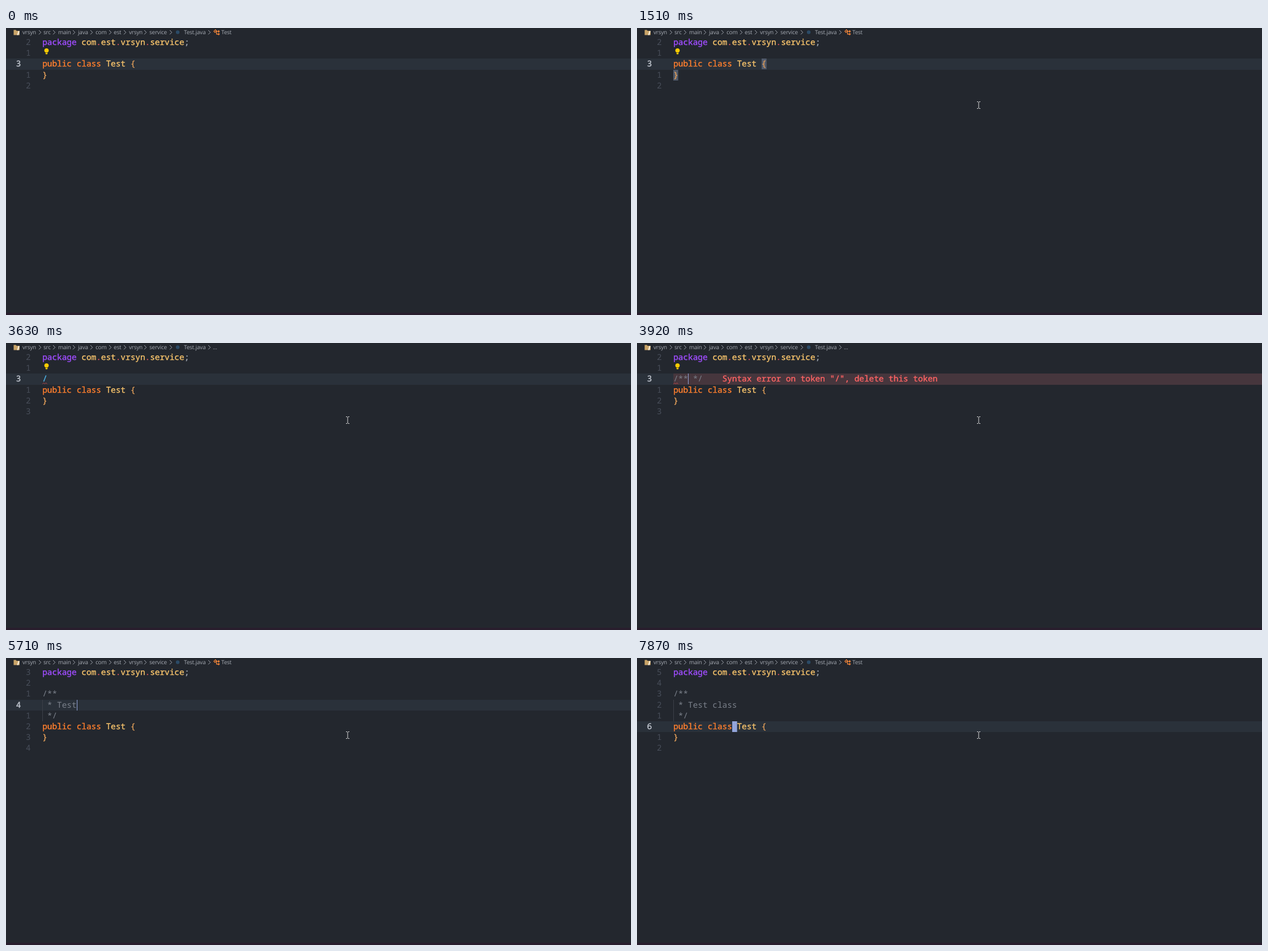
Animation of 1103 by 508 pixels, one loop 8 s. Source, as an HTML page:

```html
<!DOCTYPE html>
<html lang="en">
<head>
<meta charset="utf-8">
<title>Editor</title>
<style>
html, body { margin: 0; width: 100%; height: 100%; overflow: hidden; background: #23272e; }
svg { display: block; width: 1103px; height: 508px; }
text { white-space: pre; text-rendering: geometricPrecision; font: 500 14.4px "Noto Sans Mono", monospace; stroke-width: .4px; }
.crumb { font: 400 10px "Open Sans", "Noto Sans", sans-serif; letter-spacing: -.2px; fill: #a4a9b1; }
.line { fill: none; }
</style>
</head>
<body>
<svg id="stage" viewBox="0 0 1103 508"></svg>
<script>
const LOOP = 8000, LEFT = 64.2, CH = 8.64, ROW = 19.2, TOP = 16;
const BG = '#23272e', ACTIVE = '#2a313a', CURSOR = '#93a5da';
const PURPLE = '#a04dff', YELLOW = '#f8c46c', RED = '#e05561', GREY = '#a0a8b4',
      ORANGE = '#ff7f2e', BRACE = '#e29f5a', BLUE = '#4fb4e8', COMMENT = '#7b818b';
const ERROR = '    Syntax error on token "/", delete this token';

const stage = document.getElementById('stage');
const between = (t, a, b) => t >= a && t < b;
const colX = c => LEFT + c * CH;
const rowY = r => Math.round(TOP + r * ROW);
const baseY = r => rowY(r) + 14;
const plain = line => line.map(p => p[1]).join('');
const rect = (x, y, w, h, fill) => `<rect x="${x}" y="${y}" width="${w}" height="${h}" fill="${fill}"/>`;
const text = (x, y, fill, s) => `<text x="${x}" y="${y}" fill="${fill}">${s}</text>`;
// Code is slightly heavier than comments
const span = ([c, s]) => `<tspan fill="${c}" stroke="${c === COMMENT ? 'none' : c}">${s}</tspan>`;
const crumb = (x, s) => `<text class="crumb" x="${x}" y="11">${s}</text>`;
const path = (d, stroke, w = 1) => `<path class="line" d="${d}" stroke="${stroke}" stroke-width="${w}"/>`;
const cell = (c, r, w, fill) => rect(Math.round(colX(c)), rowY(r), w, 19, fill);
const band = (r, x, fill) => rect(x, rowY(r), 1103 - x, rowY(r + 1) - rowY(r), fill);

const pkg = [[PURPLE, 'package '], [YELLOW, 'com'], [RED, '.'], [YELLOW, 'est'], [RED, '.'],
             [YELLOW, 'vrsyn'], [RED, '.'], [YELLOW, 'service'], [GREY, ';']];
const cls = [[ORANGE, 'public class '], [YELLOW, 'Test '], [BRACE, '{']];
const end = [[BRACE, '}']];
const note = s => [[COMMENT, s]];

// Key times for the typed comment
const TYPED = 'Test class';
const KEYS = [5130, 5430, 5610, 5710, 6280, 6800, 6990, 7030, 7220, 7420];

function scene(t) {
  if (t < 2560) {
    const up = t >= 2310;
    return { lines: [pkg, [], cls, end, []], row: up ? 1 : 2, col: up ? 0 : 18, block: true,
             on: t >= 1010 && !between(t, 1510, 2000) };
  }
  if (t < 4200) {
    const col = t < 3050 ? 0 : t < 3780 ? 1 : t < 3920 ? 2 : 3;
    const typed = [[], [[BLUE, '/']], note('/*'), note('/** */')][col];
    return { lines: [pkg, [], typed, cls, end, []], row: 2, col, on: !between(t, 3550, 3780) };
  }
  const n = KEYS.filter(k => k <= t).length;
  const row = t < 7730 ? 3 : t < 7870 ? 4 : 5;
  const block = t >= 7530;
  return { lines: [pkg, [], note('/**'), note(' * ' + TYPED.slice(0, n)), note(' */'), cls, end, []],
           row, col: row === 4 ? 2 : block ? 12 : 3 + n, block, guide: true,
           on: !between(t, 4710, 5130) && !between(t, 6230, 6280) };
}

function crumbs(t) {
  const names = [[29, 'vrsyn'], [66, 'src'], [92, 'main'], [127, 'java'], [158, 'com'],
                 [190, 'est'], [217, 'vrsyn'], [253, 'service'], [314, 'Test.java']];
  const arrows = [60, 85, 120, 151, 184, 210, 246, 291, 359];
  let out = '<path d="M13.5 3.5h4l1.2 1.5h5.3v7.5h-10.5z" fill="#c9a468"/>'
    + '<path d="M19.5 12.5l2-7h2.5l-2 7z" fill="#f3e9d6"/>'
    + '<circle cx="303" cy="7.5" r="3.2" fill="#2b4a66"/>';
  out += names.map(([x, s]) => crumb(x, s)).join('');
  out += arrows.map(x => path(`M${x - 2} 4l3.7 3.7l-3.7 3.7`, '#a4a9b1')).join('');
  if (between(t, 2380, 4670)) return out + crumb(365, '...');
  return out + path('M366.8 5.8l2.8-2.8 2 2-2.8 2.8zM370.5 6h3.2M371.5 6v4.8h2.2'
    + 'M374 6l1.3-1.3 1.3 1.3-1.3 1.3zM374 10.8l1.3-1.3 1.3 1.3-1.3 1.3z', '#ff8a3a', 1.2) + crumb(380, 'Test');
}

function bulb(t) {
  const low = between(t, 5950, 6570);
  if (!low && (t >= 4200 || between(t, 2780, 3250))) return '';
  return `<g transform="translate(71.5 ${low ? 59.2 : 40})" fill="#ffcc00">`
    + '<path d="M-2 3.2C-5.2 1-4.2-4 0-4S5.2 1 2 3.2z"/><rect x="-1.8" y="3.8" width="3.6" height="2.6" rx=".8"/></g>';
}

// Pointer positions: time, x, y
const MOVES = [[190, 227, 447], [400, 420, 300], [600, 570, 145], [760, 605, 88],
               [880, 603, 71], [1010, 603, 71], [1230, 603, 136]];

function pointer(t) {
  if (t < MOVES[0][0]) return '';
  let [, x, y] = MOVES[MOVES.length - 1];
  const i = MOVES.findIndex(m => m[0] > t);
  if (i > 0) {
    const [a, b] = [MOVES[i - 1], MOVES[i]];
    const k = (t - a[0]) / (b[0] - a[0]);
    x = Math.round(a[1] + (b[1] - a[1]) * k);
    y = Math.round(a[2] + (b[2] - a[2]) * k);
  }
  return `<g transform="translate(${x} ${y + .5})">`
    + path('M-3-6h2l1 1 1-1h2M0-5V5M-3 6h2l1-1 1 1h2', '#dcdcdc') + '</g>';
}

function draw(t) {
  const s = scene(t);
  let out = rect(0, 0, 1103, 508, BG) + rect(0, 504, 1103, 4, '#291e2d') + band(s.row, 0, ACTIVE);
  const lens = between(t, 3680, 4430);
  if (lens) out += band(2, LEFT, 'rgba(228,85,84,.15)');
  if (between(t, 1010, 2310)) out += cell(18, 2, CH, '#515a6b') + cell(0, 3, CH, '#515a6b');
  if (s.guide) out += rect(64, rowY(3), 1, rowY(5) - rowY(3), '#3b4048');

  s.lines.forEach((line, r) => {
    const y = baseY(r), active = r === s.row;
    out += active ? text(17.8, y, '#c3c8d1', span(['#c3c8d1', r + 1])) : text(35.1, y, '#484e5a', Math.abs(r - s.row));
    const parts = lens && r === 2 ? [...line, ['#ff6464', ERROR]] : line;
    out += text(LEFT, y, '#fff', parts.map(span).join(''));
  });

  if (between(t, 3630, 4430)) out += path('M64.5 72.5l2-2 2 2 2-2 2 2', '#c4474b');
  if (s.on) {
    out += cell(s.col, s.row, s.block ? CH : 1, CURSOR);
    const under = s.block && plain(s.lines[s.row])[s.col];
    if (under) out += text(colX(s.col), baseY(s.row), BG, under);
  }
  return out + crumbs(t) + bulb(t) + pointer(t);
}

const start = performance.now();
let shown = '';
function frame() {
  const next = draw((performance.now() - start) % LOOP);
  if (next !== shown) stage.innerHTML = shown = next;
  requestAnimationFrame(frame);
}
frame();
</script>
</body>
</html>
```
